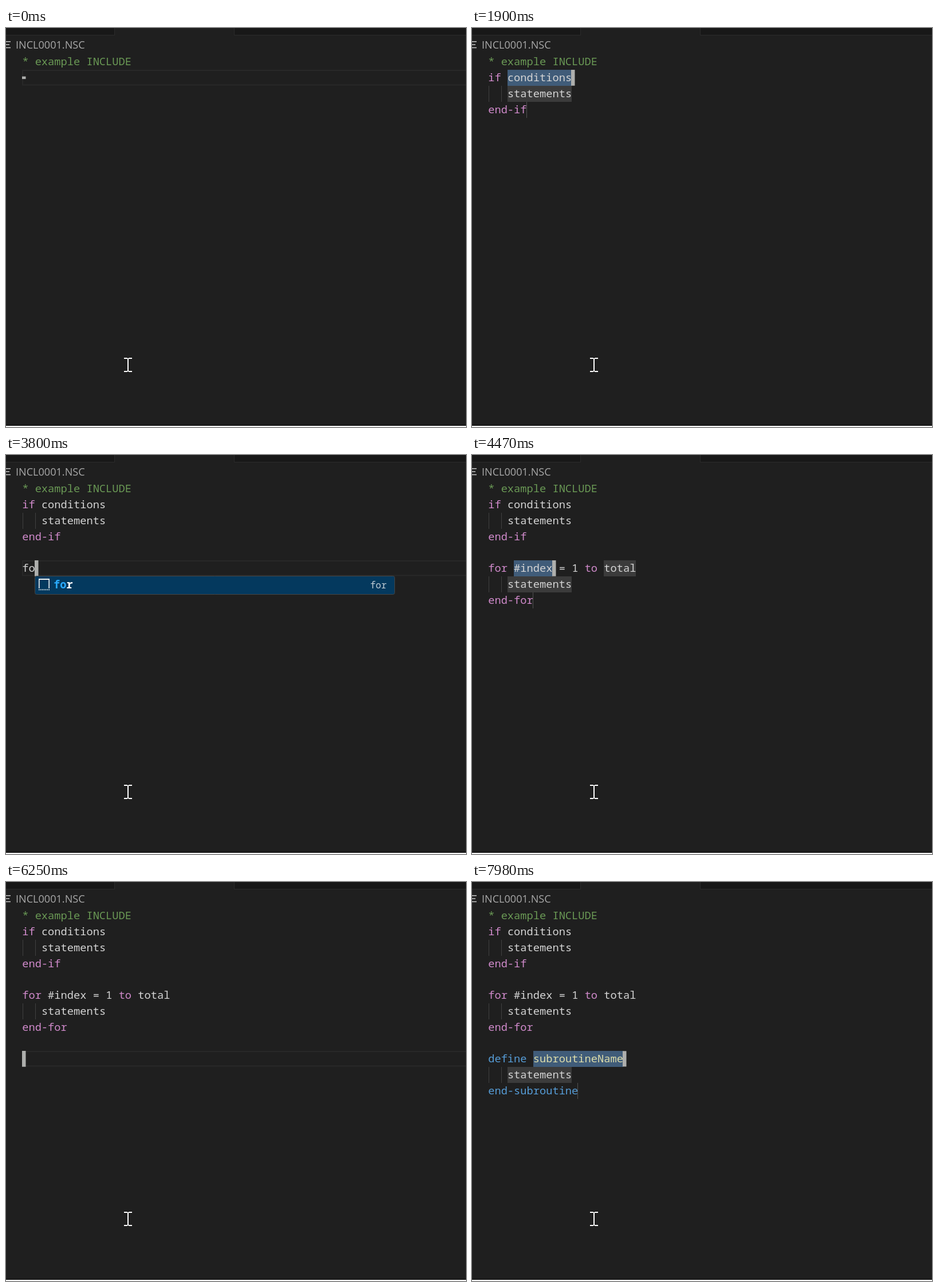
Animation of 803 by 697 pixels, one loop 8 s. Source, as an HTML page with a canvas:

```html
<!DOCTYPE html>
<html lang="en">
<head>
<meta charset="utf-8">
<title>Editor snippets</title>
<style>
  html, body { margin: 0; width: 100%; height: 100%; overflow: hidden; background: #1f1f1f; }
  canvas { display: block; }
</style>
</head>
<body>
<canvas id="stage" width="803" height="697"></canvas>
<script>
const ctx = document.getElementById("stage").getContext("2d");
const LOOP = 8000, WIDTH = 803, HEIGHT = 697;
const LEFT = 28.2, ADVANCE = 11.23, ROW = 27.75;
const MONO = '"Noto Sans Mono", "DejaVu Sans Mono", monospace';
const UI = '"Open Sans", "Noto Sans", sans-serif';
const BG = "#1f1f1f", TEXT = "#d4d4d4", PINK = "#d08acb", BLUE = "#569cd6";
const COLORS = {
  "if": PINK, "end-if": PINK, "for": PINK, "end-for": PINK, "to": PINK,
  "define": BLUE, "end-subroutine": BLUE, "subroutineName": "#dcdcaa"
};

const rowTop = row => 45.25 + ROW * row;
const colX = col => LEFT + ADVANCE * col;
const caretX = col => Math.floor(28 + ADVANCE * col);

const BODY = "   statements";
const HEAD = ["* example INCLUDE"];
const IF_BLOCK = [...HEAD, "if conditions", BODY, "end-if"];
const FOR_BLOCK = [...IF_BLOCK, "", "for #index = 1 to total", BODY, "end-for"];
const SUB_BLOCK = [...FOR_BLOCK, "", "define subroutineName", BODY, "end-subroutine"];

// Ranges are [row, column, length].
const COND = [1, 3, 10], IF_BODY = [2, 3, 10], IF_END = [3, 6];
const INDEX = [5, 4, 6], TOTAL = [5, 18, 5], FOR_BODY = [6, 3, 10], FOR_END = [7, 7];
const NAME = [9, 7, 14], SUB_BODY = [10, 3, 10], SUB_END = [11, 14];

const at = (time, lines, row, col, extra = {}) => ({ time, lines, row, col, ...extra });
const typing = (time, before, text, label, detail = label, shown = text.length) =>
  at(time, [...before, text], before.length, text.length,
    { popup: label && { label, detail, typed: shown } });
const select = (time, lines, range, marks = [], end = null, match = null) =>
  at(time, lines, range[0], range[1] + range[2], { selected: range, marks, end, match });

const STEPS = [
  at(0, HEAD, 1, 0, { reset: -1183 }),
  typing(760, HEAD, "i"),
  typing(830, HEAD, "i", "if"),
  typing(900, HEAD, "if", "if", "if", 1),
  typing(970, HEAD, "if", "if"),
  select(1370, IF_BLOCK, COND),
  select(1440, IF_BLOCK, COND, [COND, IF_BODY], IF_END),
  select(2100, IF_BLOCK, IF_BODY, [COND, IF_BODY], IF_END),
  at(2300, IF_BLOCK, 3, 6),
  at(2900, IF_BLOCK, 4, 0),
  at(3120, IF_BLOCK, 5, 0),
  typing(3670, [...IF_BLOCK, ""], "f", "for"),
  typing(3800, [...IF_BLOCK, ""], "fo", "for"),
  typing(3930, [...IF_BLOCK, ""], "for", "for"),
  select(4400, FOR_BLOCK, INDEX),
  select(4470, FOR_BLOCK, INDEX, [INDEX, TOTAL, FOR_BODY], FOR_END),
  select(4990, FOR_BLOCK, TOTAL, [INDEX, TOTAL, FOR_BODY], FOR_END),
  select(5190, FOR_BLOCK, FOR_BODY, [INDEX, TOTAL, FOR_BODY], FOR_END, IF_BODY),
  at(5590, FOR_BLOCK, 7, 7),
  at(6050, FOR_BLOCK, 8, 0),
  at(6250, FOR_BLOCK, 9, 0),
  ...[6520, 6650, 6800, 6930, 7060].map((time, i) =>
    typing(time, [...FOR_BLOCK, ""], "define".slice(0, i + 1), "define", "define subroutine")),
  select(7390, SUB_BLOCK, NAME),
  select(7520, SUB_BLOCK, NAME, [NAME, SUB_BODY], SUB_END)
];
// Adding decorations does not restart the caret's blink.
for (const [i, step] of STEPS.entries()) {
  const prev = STEPS[i - 1];
  const moved = !prev || prev.row !== step.row || prev.col !== step.col;
  step.reset ??= moved ? step.time - 40 : prev.reset;
}

function rect(color, x, y, w, h) {
  ctx.fillStyle = color;
  ctx.fillRect(x, y, w, h);
}

function write(text, x, y, color, size, family = MONO, weight = 500) {
  ctx.font = `${weight} ${size}px ${family}`;
  ctx.fillStyle = color;
  ctx.fillText(text, x, y);
}

function mark([row, col, length], color) {
  const x = Math.round(colX(col)), y = Math.round(rowTop(row));
  rect(color, x, y, Math.round(colX(col + length)) - x, Math.round(rowTop(row + 1)) - y);
}

function easeInOut(x) {
  let lo = 0, hi = 1;
  for (let i = 0; i < 20; i++) {
    const u = (lo + hi) / 2;
    const bx = 3 * u * (1 - u) * (0.42 * (1 - u) + 0.58 * u) + u ** 3;
    if (bx < x) lo = u; else hi = u;
  }
  return lo * lo * (3 - 2 * lo);
}

function caretScale(idle) {
  if (idle < 600) return 1;
  const u = (idle - 600) % 1000;
  if (u < 300) return 1 - easeInOut(u / 300);
  if (u < 500) return 0;
  return u < 800 ? easeInOut((u - 500) / 300) : 1;
}

function drawChrome() {
  rect(BG, 0, 0, WIDTH, HEIGHT);
  rect("#181818", 0, 0, 189, 12);
  rect("#181818", 399, 0, WIDTH - 399, 12);
  rect("#2b2b2b", 0, 12, 190, 1);
  rect("#2b2b2b", 398, 12, WIDTH - 398, 1);
  rect("#2b2b2b", 189, 0, 1, 13);
  rect("#2b2b2b", 398, 0, 1, 13);
  [8, 6, 8].forEach((w, i) => rect("#c0c0c0", 0, 23 + 5.3 * i, w, 1.6));
  write("INCL0001.NSC", 17, 36, "#a9a9a9", 18.1, UI, 400);
  rect("#181818", 0, 693, WIDTH, 2);
  rect("#ffffff", 0, 695, WIDTH, 2);
}

function drawLine(line, row) {
  const y = rowTop(row) + 20.2;
  if (line[0] === "*") return write(line, colX(0), y, "#6a9955", 18.72);
  for (const { 0: word, index } of line.matchAll(/\S+/g))
    write(word, colX(index), y, COLORS[word] || TEXT, 18.72);
}

function drawGuides(lines, caretRow) {
  lines.forEach((line, row) => {
    if (line !== BODY) return;
    const y = Math.round(rowTop(row));
    rect("#404040", 29, y, 1, 28);
    rect(row === caretRow ? "#707070" : "#404040", 51, y, 1, 28);
  });
}

function drawPopup({ label, typed, detail }, row, col) {
  const x = caretX(col), y = Math.round(rowTop(row + 1));
  ctx.beginPath();
  ctx.roundRect(x + 0.5, y - 0.5, 628, 32, 3);
  ctx.fillStyle = "#04395e";
  ctx.fill();
  ctx.strokeStyle = "#454545";
  ctx.lineWidth = 1;
  ctx.stroke();

  rect("#f4f4f4", x + 7, y + 4, 19, 2);
  rect("#f4f4f4", x + 7, y + 4, 1.6, 17);
  rect("#f4f4f4", x + 24.4, y + 4, 1.6, 17);
  for (let i = 0; i < 7; i++) rect("#f4f4f4", x + 7 + i * 2.9, y + 22.5, 1.6, 1.7);

  const base = y + 21;
  write(label.slice(0, typed), x + 33, base, "#2aaaff", 18.72, MONO, "bold");
  write(label.slice(typed), x + 33 + typed * ADVANCE, base, "#ffffff", 18.72, MONO, "bold");
  ctx.textAlign = "right";
  write(detail, x + 614.5, base - 0.5, "#c3ced7", 15.95);
  ctx.textAlign = "left";
}

function drawPointer() {
  const white = "#ffffff";
  rect(white, 206, 576, 6, 2);
  rect(white, 214, 576, 6, 2);
  rect(white, 212, 577, 2, 23);
  rect(white, 206, 599, 6, 2);
  rect(white, 214, 599, 6, 2);
}

function draw(time) {
  const step = STEPS.findLast(s => s.time <= time);
  const { lines, row, col, selected, marks = [], match, end, popup, reset } = step;
  drawChrome();

  if (!selected) {
    ctx.strokeStyle = "#282828";
    ctx.lineWidth = 2;
    ctx.strokeRect(29, Math.round(rowTop(row)) + 1, WIDTH, 25.5);
  }
  if (match) mark(match, "rgba(173,214,255,.15)");
  if (selected) mark(selected, "#264f78");
  marks.forEach(range => mark(range, "rgba(124,124,124,.3)"));
  drawGuides(lines, row);
  lines.forEach(drawLine);
  if (end) rect("#525252", Math.round(colX(end[1])) - 1, Math.round(rowTop(end[0])), 1, 28);

  const h = 27.75 * caretScale(time - reset);
  rect("#aeafad", caretX(col), rowTop(row) + (27.75 - h) / 2, 6.5, h);
  if (popup) drawPopup(popup, row, col);
  drawPointer();
}

const start = performance.now();
function tick() {
  draw((performance.now() - start) % LOOP);
  requestAnimationFrame(tick);
}
tick();
</script>
</body>
</html>
```
